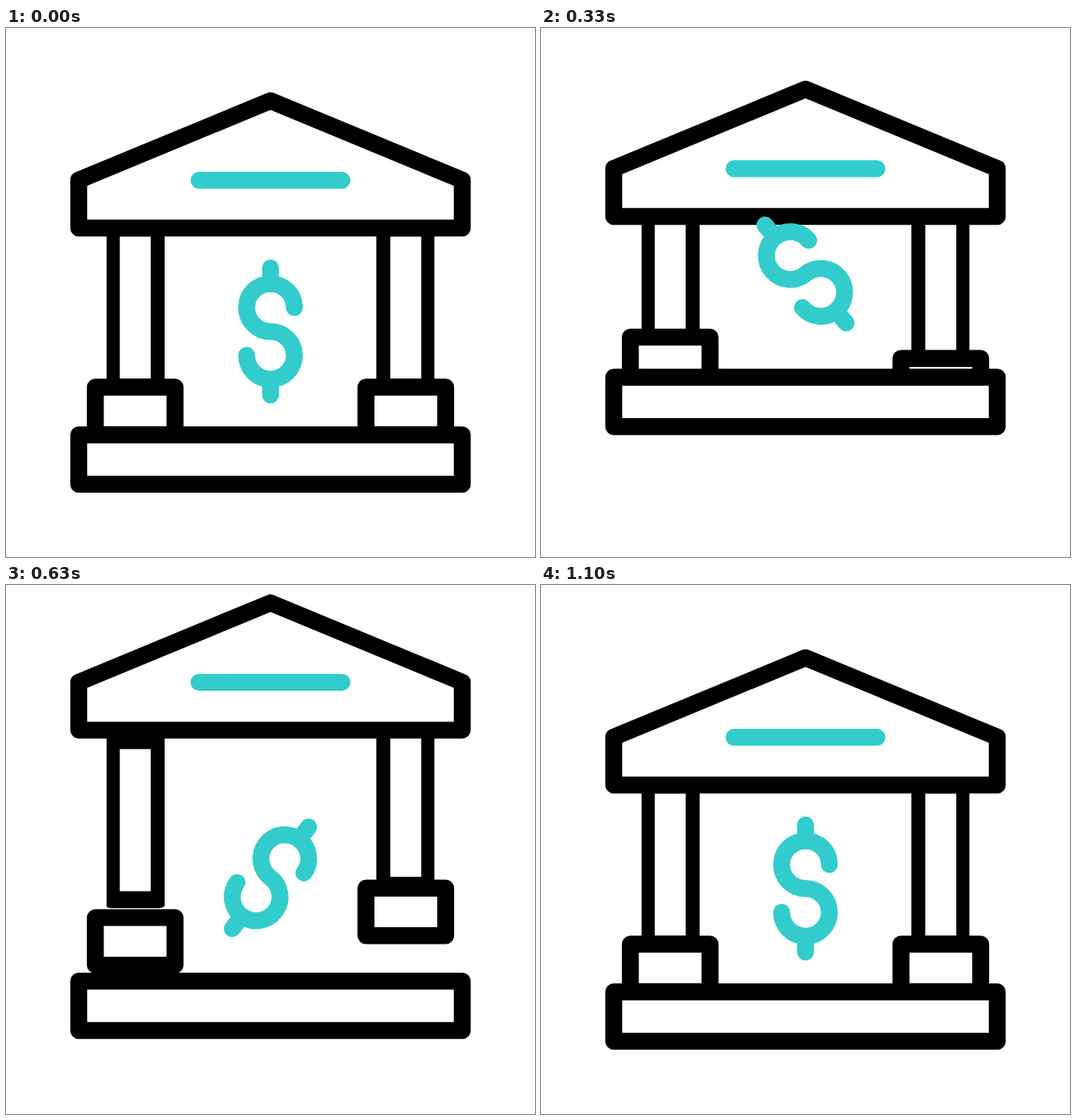
Write an HTML page that moves like this. It is 640x640 px and loops after 1.67 s.

```html
<!DOCTYPE html>
<html lang="en">
<head>
<meta charset="utf-8">
<title>Bank</title>
<style>
  html, body { margin: 0; width: 100%; height: 100%; overflow: hidden; background: #fff; }
  svg { display: block; width: 100%; height: 100%; }
  .ink { fill: #fff; stroke: #000; }
  .teal { fill: none; stroke: #3cc; }
  .ink, .teal { stroke-width: 20.48; stroke-linecap: round; stroke-linejoin: round; }
</style>
</head>
<body>
<svg viewBox="0 0 640 640">
  <defs>
    <clipPath id="clipL"><rect x="121.7" y="200" width="70.2" height="300"/></clipPath>
    <clipPath id="clipR"><rect x="448.1" y="200" width="70.2" height="300"/></clipPath>
  </defs>
  <g id="columnL"><rect class="ink" clip-path="url(#clipL)" x="127.4" y="242" width="57.9" height="192.4"/></g>
  <g id="columnR"><rect class="ink" clip-path="url(#clipR)" x="454.7" y="242" width="57.9" height="192.4"/></g>
  <g id="blockL"><rect class="ink" x="108.1" y="434.6" width="96.4" height="57.5"/></g>
  <g id="blockR"><rect class="ink" x="435.5" y="434.6" width="96.4" height="57.5"/></g>
  <g id="roof">
    <path class="ink" d="M88 184 320 88 552 184V242H88Z"/>
    <path class="teal" d="M233.5 184.2H406.5"/>
  </g>
  <g id="base"><rect class="ink" x="88" y="492.2" width="464" height="59.8"/></g>
  <g id="dollar">
    <path class="teal" d="M320 290.3V309.4M320 425V444.1M348.9 338.3A28.9 28.9 0 1 0 320 367.2A28.9 28.9 0 1 1 291.1 396.1"/>
  </g>
</svg>
<script>
  const LOOP = 1670, LAST = 33, LIFT = 71.3;

  // Times in ticks of 1/30 s: rise starts, rise ends, fall starts, fall ends
  const lifts = {
    base:    [0, 11, 11, 22],
    blockL:  [1.1, 12.9, 13.2, 24.1],
    columnL: [2.2, 15, 15.4, 26.5],
    blockR:  [3.3, 16.9, 17.5, 28.7],
    columnR: [4.4, 19.3, 19.6, 30.6],
    roof:    [5.4, 21.6, 22, 33]
  };
  const el = id => document.getElementById(id);
  const parts = Object.entries(lifts).map(([id, times]) => [el(id), times]);
  const dollar = el('dollar');

  function ease(n, from, to) {
    const x = Math.min(1, Math.max(0, (n - from) / (to - from)));
    return x * x * (3 - 2 * x);
  }

  const rise = (n, [a, b, c, d]) => -LIFT * (ease(n, a, b) - ease(n, c, d));

  // Ticks last 30, 40 and 30 ms in turn; the last pose is held
  function tick(ms) {
    const rest = ms % 100;
    const n = Math.floor(ms / 100) * 3 + (rest >= 70 ? 2 : rest >= 30 ? 1 : 0);
    return Math.min(n, LAST);
  }

  function draw(ms) {
    const n = tick(ms);
    for (const [node, times] of parts) {
      node.setAttribute('transform', `translate(0 ${rise(n, times).toFixed(2)})`);
    }
    // Small wind-up to the left, then two turns to the right
    const turn = -40.8 * ease(n, 1.05, 11) + 760.8 * ease(n, 11.35, 25.25);
    dollar.setAttribute('transform',
      `translate(0 ${rise(n, lifts.base).toFixed(2)}) rotate(${turn.toFixed(2)} 320 367.2)`);
  }

  const start = performance.now();
  function loop() {
    draw((performance.now() - start) % LOOP);
    requestAnimationFrame(loop);
  }
  loop();
</script>
</body>
</html>
```
